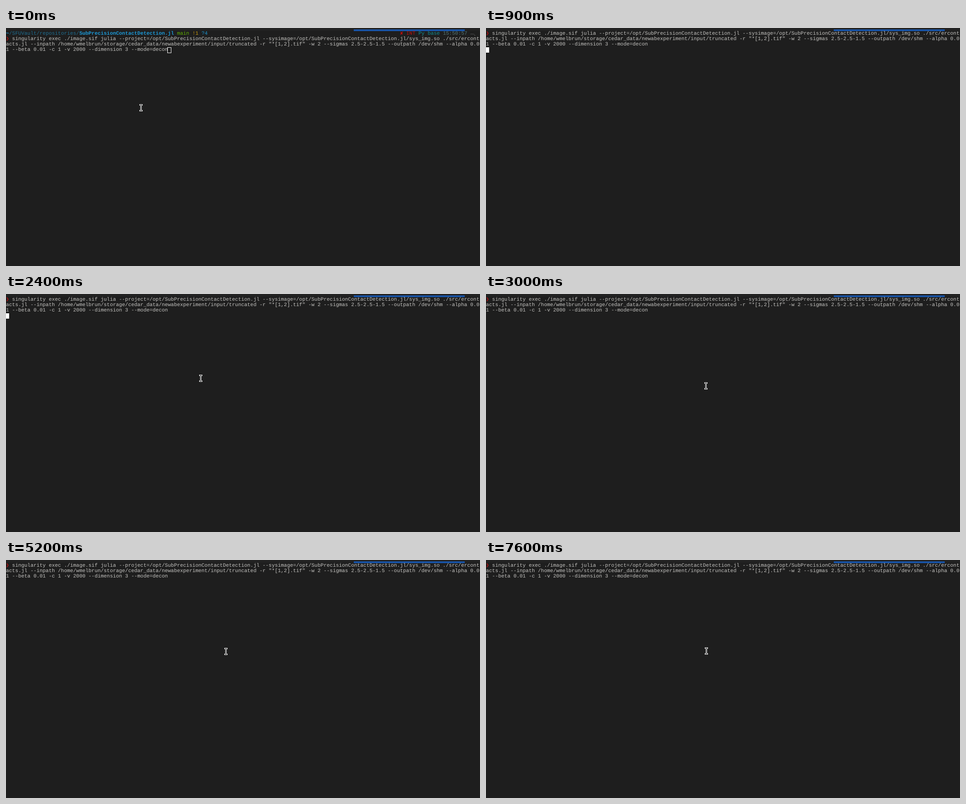
Recreate the animation shown at these times as an HTML page. Size 1055x531 px, loop 8000 ms.

```html
<!DOCTYPE html>
<html lang="en">
<head>
<meta charset="utf-8">
<title>Terminal session</title>
<style>
  html, body { margin: 0; width: 100%; height: 100%; overflow: hidden; background: #1e1e1e; }
  svg { display: block; width: 1055px; height: 531px; }
  text {
    font: 11.33px "Liberation Mono", monospace;
    fill: #c4c3c0;
    white-space: pre;
    text-rendering: geometricPrecision;
  }
  .bold { font-weight: bold; }
  .symbol { font-family: "DejaVu Sans Mono", monospace; fill: #c01010; }
  .dir { fill: #1f6f92; }
  .anchor { fill: #1d99d6; }
</style>
</head>
<body>
<svg viewBox="0 0 1055 531">
  <defs>
    <path id="beam" d="M-2 -6.5H2M-2 6.5H2M0 -6.5V6.5" fill="none" stroke-linecap="square"/>
  </defs>
  <rect width="1055" height="6" fill="#222"/>
  <rect x="774" y="3" width="247" height="4" fill="#1853a5"/>

  <g id="prompt">
    <text y="15"><tspan class="bold anchor">~</tspan><tspan class="dir">/SFUVault/repositories/</tspan><tspan class="bold anchor">SubPrecisionContactDetection.jl</tspan><tspan fill="#5faf00"> main</tspan><tspan fill="#c79a12"> !1</tspan><tspan class="anchor"> ?4</tspan></text>
    <text x="877.2" y="15" class="symbol">✘</text>
    <text x="890.8" y="15"><tspan fill="#c01010">INT</tspan><tspan fill="#128d94"> Py base</tspan><tspan fill="#547676"> 15:50:57</tspan></text>
    <path d="M1033.5 13.5H1040Q1043.5 13.5 1043.5 18" fill="none" stroke="#505050"/>
  </g>

  <g id="command">
    <text y="27" class="symbol">❯</text>
    <text x="13.6" y="27">singularity exec ./image.sif julia --project=/opt/SubPrecisionContactDetection.jl --sysimage=/opt/SubPrecisionContactDetection.jl/sys_img.so ./src/ercont</text>
    <text y="39">acts.jl --inpath /home/wmelbrun/storage/cedar_data/newabexperiment/input/truncated -r "*[1,2].tif" -w 2 --sigmas 2.5-2.5-1.5 --outpath /dev/shm --alpha 0.0</text>
    <text y="51">1 --beta 0.01 -c 1 -v 2000 --dimension 3 --mode=decon</text>
  </g>

  <rect id="hollow" x="359.5" y="43.5" width="8" height="12" fill="none" stroke="#fff"/>
  <rect id="block" y="43" width="7" height="12" fill="#fff"/>

  <g id="pointer">
    <use href="#beam" stroke="#fff" stroke-width="3"/>
    <use href="#beam" stroke="#111"/>
  </g>
</svg>
<script>
  const LOOP = 8000, TICK = 100;
  const FOCUS = 100, ENTER = 900, POINTER_BACK = 2300;
  const BLINK = 605, BLINK_START = 890;

  // The pointer jumps to each stop, or glides there over the given time.
  const stops = [
    { at: 0, x: 300, y: 178 },
    { at: POINTER_BACK, x: 304, y: 177 },
    { at: 2400, x: 433, y: 188 },
    { at: 2600, x: 517, y: 198 },
    { at: 2700, x: 487, y: 205, glide: 400 },
    { at: 5000, x: 490, y: 203, glide: 400 }
  ];

  const node = id => document.getElementById(id);
  const [prompt, command, hollow, block, pointer] =
    ["prompt", "command", "hollow", "block", "pointer"].map(node);
  const show = (el, on) => el.setAttribute("visibility", on ? "visible" : "hidden");
  const move = (el, x, y) => el.setAttribute("transform", `translate(${x} ${y})`);
  const easeOut = u => 1 - (1 - u) ** 2;

  function pointerAt(time) {
    const i = stops.findLastIndex(stop => stop.at <= time);
    const to = stops[i], from = stops[Math.max(0, i - 1)];
    const u = to.glide ? easeOut(Math.min(1, (time - to.at) / to.glide)) : 1;
    const mix = (a, b) => Math.round(a + (b - a) * u);
    return [mix(from.x, to.x) + 0.5, mix(from.y, to.y)];
  }

  function blockVisible(time) {
    if (time < ENTER) return time >= FOCUS && time < FOCUS + 600;
    return Math.floor((time - BLINK_START) / BLINK) % 2 === 0;
  }

  function draw(time) {
    const entered = time >= ENTER;
    show(prompt, !entered);
    move(command, 0, entered ? -12 : 0);
    show(hollow, time < FOCUS);
    show(block, blockVisible(time));
    move(block, entered ? 0 : 360, 0);
    show(pointer, !entered || time >= POINTER_BACK);
    move(pointer, ...pointerAt(time));
  }

  const start = performance.now();
  function frame() {
    const time = (performance.now() - start) % LOOP;
    draw(Math.floor(time / TICK) * TICK);
    requestAnimationFrame(frame);
  }
  frame();
</script>
</body>
</html>
```
